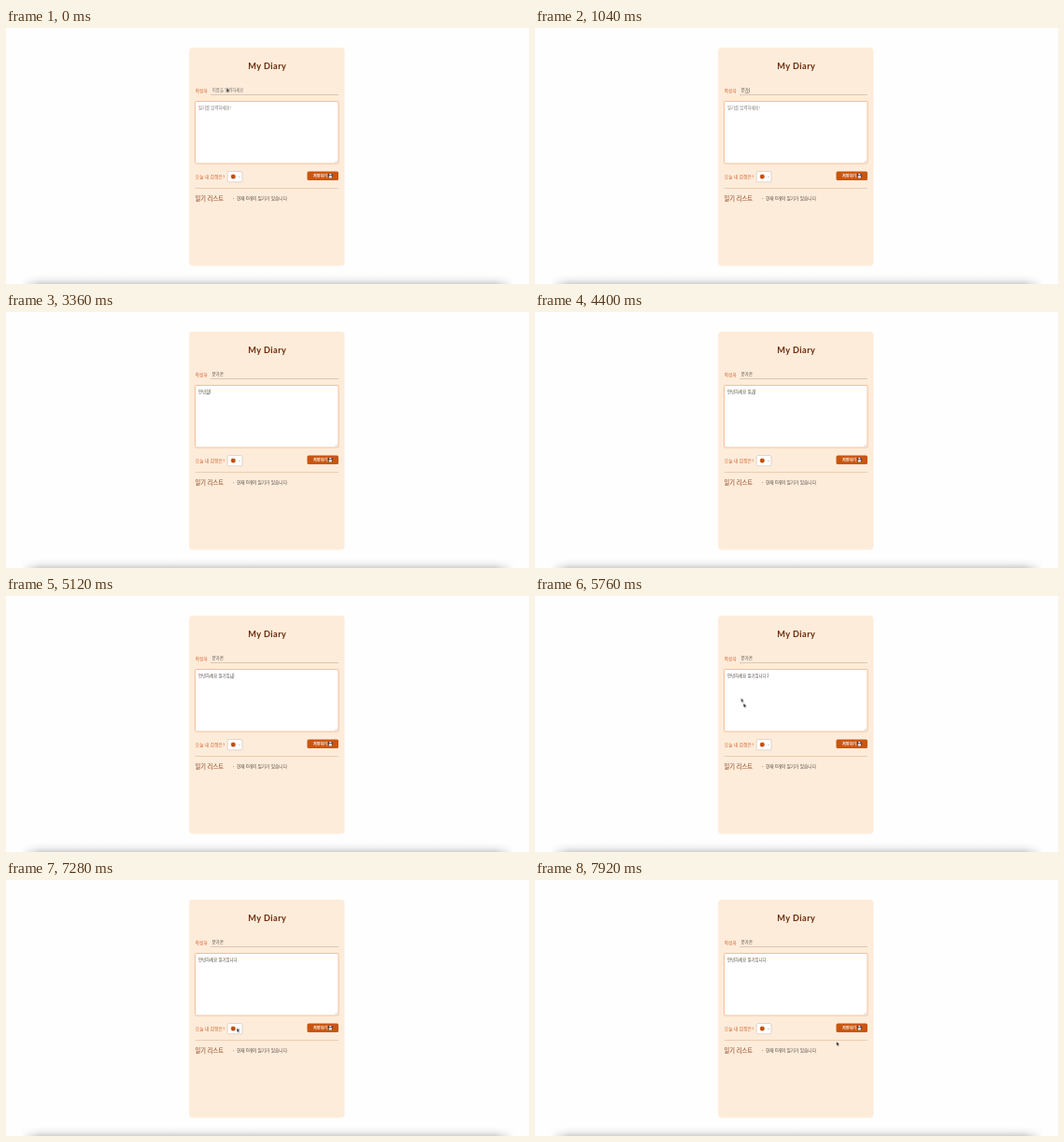
Recreate the animation shown at these times as an HTML page. Size 560 by 274 pixels, loop 8 s.

```html
<!DOCTYPE html>
<html lang="ko">
<head>
<meta charset="utf-8">
<title>My Diary</title>
<style>
  html, body { margin: 0; width: 100%; height: 100%; overflow: hidden; background: #fefefe; }
  svg { display: block; width: 100%; height: 100%; overflow: hidden; }
  text { font: 4.4px "Noto Sans CJK KR", "Noto Sans CJK", sans-serif; fill: #4b4440; white-space: pre; }
  .title { font: bold 9.2px Lato, sans-serif; letter-spacing: .42px; fill: #6d2b0b; }
  .label { fill: #d0602a; }
  .hint { fill: #77716d; }
  .live { text-decoration: underline; text-decoration-thickness: .4px; }

  .cursor, .ghost, .ring, .menu { animation: 8s linear infinite; }
  .cursor { animation-name: move; }
  .ghost { opacity: 0; animation-name: ghost; animation-timing-function: step-end; }
  .ring { opacity: 0; animation-name: click; animation-timing-function: step-end; }
  .menu { opacity: 0; animation-name: menu; animation-timing-function: step-end; }

  @keyframes move {
    0%, 6.5% { transform: translate(236.3px, 64.3px); opacity: 1; }
    6.6% { transform: translate(236.3px, 64.3px); opacity: 0; }
    17.9% { transform: translate(236.3px, 64.3px); opacity: 0; }
    18% { transform: translate(236.3px, 64.3px); opacity: 1; animation-timing-function: ease-in-out; }
    25% { transform: translate(220.8px, 110px); opacity: 1; }
    30% { transform: translate(220.8px, 110px); opacity: 1; }
    30.1% { transform: translate(220.8px, 110px); opacity: 0; }
    70.9% { transform: translate(220.8px, 110px); opacity: 0; }
    71% { transform: translate(220.8px, 110px); opacity: 1; }
    72% { transform: translate(223.2px, 114.6px); opacity: 1; animation-timing-function: ease-out; }
    78%, 90% { transform: translate(245.3px, 158px); opacity: 1; animation-timing-function: ease-in-out; }
    99%, 100% { transform: translate(322.8px, 173px); opacity: 1; }
  }
  @keyframes ghost {
    0% { opacity: 0; }
    72% { opacity: .9; }
    73% { opacity: 0; }
  }
  @keyframes click {
    0% { opacity: 0; }
    2% { opacity: 1; }
    4% { opacity: 0; }
    25% { opacity: 1; }
    27% { opacity: 0; }
    79% { opacity: 1; }
    81% { opacity: 0; }
    89% { opacity: 1; }
    90% { opacity: 0; }
  }
  @keyframes menu {
    0% { opacity: 0; }
    80% { opacity: 1; }
    90% { opacity: 0; }
  }
</style>
</head>
<body>
<svg viewBox="0 0 560 274">
  <defs>
    <g id="face">
      <circle r="2.5" fill="#d95f1c"/>
      <path d="M-1.5-.8h1M.5-.8h1M-1.2.9q1.2 1 2.4 0" fill="none" stroke="#6a2208" stroke-width=".7"/>
    </g>
    <path id="arrow" d="M0 0V4.3L1 3.4L1.8 5L2.6 4.6L1.9 3.1H3.1Z" fill="#111" stroke="#fff" stroke-width=".3"/>
    <filter id="soft" x="-50%" y="-50%" width="200%" height="200%"><feGaussianBlur stdDeviation="2"/></filter>
    <linearGradient id="shade" x2="0" y2="1">
      <stop offset="0" stop-color="#888" stop-opacity="0"/>
      <stop offset=".5" stop-color="#888" stop-opacity=".1"/>
      <stop offset="1" stop-color="#888" stop-opacity=".38"/>
    </linearGradient>
    <linearGradient id="ends">
      <stop offset="0" stop-color="#000"/>
      <stop offset=".04" stop-color="#fff"/>
      <stop offset=".96" stop-color="#fff"/>
      <stop offset="1" stop-color="#000"/>
    </linearGradient>
    <mask id="fade"><rect x="16" y="260" width="528" height="14" fill="url(#ends)"/></mask>
  </defs>

  <rect x="16" y="264" width="528" height="10" fill="url(#shade)" mask="url(#fade)"/>
  <rect x="196" y="21" width="166.5" height="233.5" rx="4" fill="#feecda"/>
  <text class="title" x="279.8" y="44.2" text-anchor="middle">My Diary</text>

  <text class="label" x="202.8" y="68.6" style="font-size:4.7px">작성자</text>
  <path d="M219 71.5H356" stroke="#cdb7a4" stroke-width=".7"/>
  <g class="field"></g>

  <rect x="202.5" y="78.5" width="153.5" height="66.5" rx="1.2" fill="#fff" stroke="#f0b084" stroke-width=".8"/>
  <path d="M352.3 144l2.5-2.5M353.8 144l1-1" stroke="#999" stroke-width=".4"/>
  <g class="field"></g>

  <text class="label" x="202.8" y="161" style="font-size:4.8px">오늘 내 감정은?</text>
  <rect x="237.2" y="153.6" width="15.8" height="11.2" rx="1.2" fill="#fff" stroke="#c9beb5" stroke-width=".6"/>
  <use href="#face" x="243.3" y="159"/>
  <path d="M249 158.9l1 1l1-1" fill="none" stroke="#888" stroke-width=".4"/>

  <rect x="322.5" y="153.5" width="33.5" height="9.5" rx="1.6" fill="#c9560f"/>
  <text x="329" y="159.8" style="font-size:4.1px;font-weight:bold;fill:#fff">저장하기</text>
  <rect x="345.1" y="156" width="4.4" height="4.5" rx=".5" fill="#35343f"/>
  <path d="M346.2 156h2.2v1.6h-2.2zM345.7 158.3h3.2v2.2h-3.2z" fill="#f3eef0"/>

  <path d="M202.7 171.5H356" stroke="#e4c4a8" stroke-width=".8"/>
  <text x="202.6" y="184.6" style="font-size:6.25px;fill:#8a3a16">일기 리스트</text>
  <text x="242.8" y="183.8" style="font-size:4.7px">-</text>
  <text x="247" y="183.8" style="font-size:4.7px">현재 0개의 일기가 있습니다</text>

  <g class="menu">
    <rect x="234" y="155" width="21.5" height="38" rx="2" opacity=".4" filter="url(#soft)"/>
    <rect x="234.2" y="154" width="21" height="38" rx="1.8" fill="#4d4643" stroke="#726a66" stroke-width=".4"/>
    <rect x="235.2" y="155" width="19" height="9.4" rx="1.2" fill="#3670e2"/>
    <path d="M237.6 160l1.2 1.3l2-3.2" fill="none" stroke="#fff" stroke-width=".7"/>
    <use href="#face" x="246.3" y="159.8"/>
    <use href="#face" x="246.3" y="168.4"/>
    <use href="#face" x="246.3" y="177"/>
    <use href="#face" x="246.3" y="185.6"/>
  </g>

  <use class="ghost" href="#arrow" x="220.6" y="109.3"/>
  <g class="cursor">
    <circle class="ring" r="7.4" fill="#fff" fill-opacity=".3" stroke="#555" stroke-width=".6"/>
    <use href="#arrow"/>
  </g>
</svg>
<script>
const LOOP = 8000, STEP = 80;

// Each group holds the stages of one syllable while it is being composed.
const fields = [
  { x: 220.8, y: 68.3, hint: '이름을 입력하세요', text: '문가온', keys: 'ㅁ무문|ㄱ가강|오온',
    focus: 240, blur: 2000, at: k => 560 + 100 * k },
  { x: 206, y: 86.7, hint: '일기를 입력하세요!', text: '안녕하세요 일기입니다.',
    keys: 'ㅇ아안|ㄴ녀녕|ㅎ하핫|세셍|요| |ㅇ이일읽|기깅|이입|ㄴ니닏|다|.',
    focus: 2000, blur: 6320, at: k => k < 18 ? 2420 + 115 * k : 4565 + 137 * (k - 18) }
];

function add(parent, tag, attrs) {
  const el = document.createElementNS('http://www.w3.org/2000/svg', tag);
  for (const name in attrs) el.setAttribute(name, attrs[name]);
  return parent.appendChild(el);
}

fields.forEach((f, i) => {
  const box = document.querySelectorAll('.field')[i];
  f.label = add(box, 'text', { x: f.x, y: f.y });
  f.done = add(f.label, 'tspan', {});
  f.live = add(f.label, 'tspan', {});
  f.caret = add(box, 'rect', { y: f.y - 4.2, width: .4, height: 5, fill: '#333' });
  f.steps = f.keys.split('|').flatMap((group, n) =>
    [...group].map(char => ({ done: f.text.slice(0, n), char })));
});

function draw(f, t) {
  const count = f.steps.filter((_, k) => f.at(k) <= t).length;
  const step = f.steps[count - 1];
  const focused = t >= f.focus && t < f.blur;
  const ended = count === f.steps.length && !focused;
  f.label.setAttribute('class', count ? '' : 'hint');
  f.done.textContent = !step ? f.hint : ended ? f.text : step.done;
  f.live.textContent = !step || ended ? '' : step.char;
  f.live.setAttribute('class', step && /[ .]/.test(step.char) ? '' : 'live');
  const width = step ? f.label.getComputedTextLength() : 0;
  f.caret.setAttribute('x', f.x + width + .1);
  f.caret.setAttribute('opacity', focused ? 1 : 0);
}

let start;
function tick(now) {
  start ??= now;
  const t = Math.floor((now - start) % LOOP / STEP) * STEP;
  fields.forEach(f => draw(f, t));
  requestAnimationFrame(tick);
}
fields.forEach(f => draw(f, 0));
requestAnimationFrame(tick);
</script>
</body>
</html>
```
